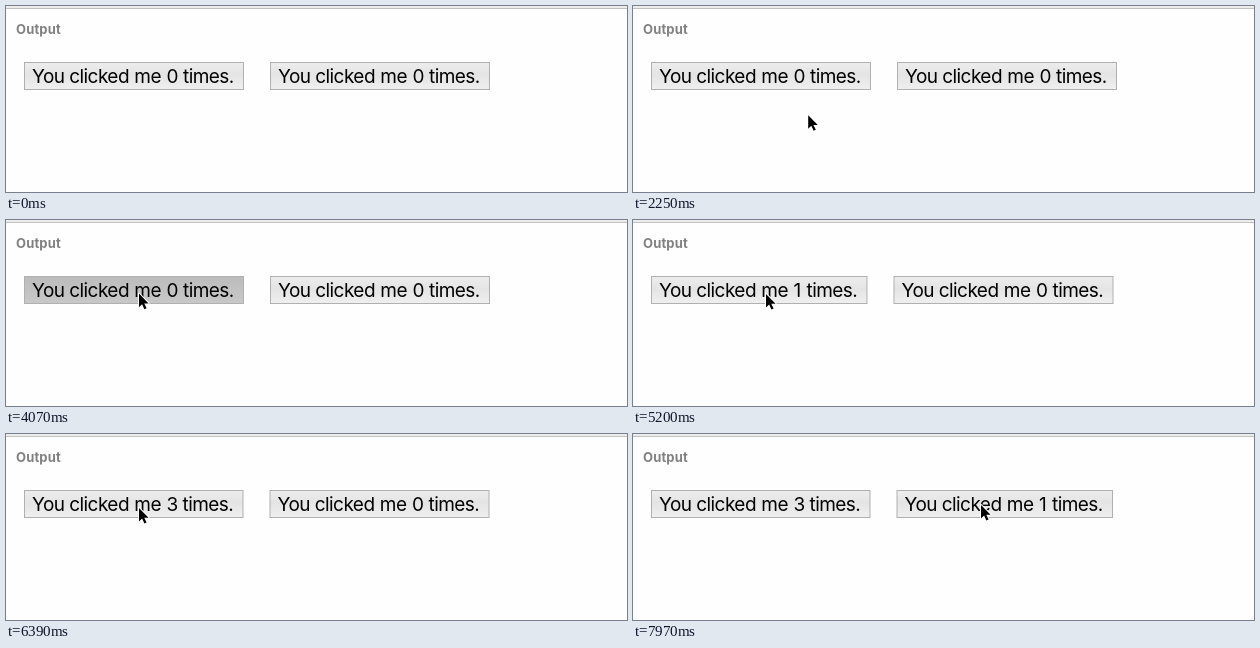
An HTML page that plays this animation: 621x186 px, repeating every 8000 ms.

```html
<!DOCTYPE html>
<html lang="en">
<head>
<meta charset="utf-8">
<title>Click counters</title>
<style>
  html, body { margin: 0; width: 100%; height: 100%; overflow: hidden; background: #fefefe; }
  svg { display: block; width: 621px; height: 186px; }
  text { font-family: Inter, "Liberation Sans", sans-serif; font-optical-sizing: none; white-space: pre; }
  .heading { font-size: 13px; font-weight: 700; letter-spacing: .15px; fill: #808080; }
  .label { font-size: 19px; letter-spacing: -.55px; fill: #000; }
</style>
</head>
<body>
<svg viewBox="0 0 621 186">
  <defs>
    <linearGradient id="idle" x2="0" y2="1">
      <stop stop-color="#ededed"/>
      <stop offset=".45" stop-color="#e4e4e4"/>
      <stop offset="1" stop-color="#efefef"/>
    </linearGradient>
    <linearGradient id="pressed" x2="0" y2="1">
      <stop stop-color="#bcbcbc"/>
      <stop offset="1" stop-color="#c8c8c8"/>
    </linearGradient>
  </defs>
  <rect width="621" height="186" fill="#fefefe"/>
  <rect width="621" height="2" fill="#ececec"/>
  <rect y="2" width="621" height="1" fill="#c2c2c2"/>
  <text class="heading" x="10" y="28">Output</text>
  <g id="buttons"></g>
  <path id="cursor" d="M1 2V15.6L4.1 12.6 6.4 17.6 8.6 16.6 6.3 11.8H10.6Z"
    stroke="#fff" stroke-width="2" stroke-linejoin="round" paint-order="stroke"/>
</svg>
<script>
const LOOP = 8000;
const GAP = 26;
const WIDTHS = [220, 216.5, 219, 219.5]; // button width for each count

// [press, release] times of each button
const CLICKS = [
  [[4070, 4360], [5440, 5610], [6270, 6390]],
  [[7670, 7970]]
];

// The pointer advances in discrete steps: start, end, step count
const STROKES = [[1320, 1550, 5], [1780, 2530, 12], [2590, 3290, 11], [5200, 5200, 1], [6620, 7020, 8]];

// time, x, y
const PATH = [
  [1320, 318, 172], [1435, 244, 124], [1550, 189, 97],
  [1780, 188, 99], [2000, 181, 111], [2250, 172, 106],
  [2390, 112, 64], [2470, 81, 36], [2530, 100, 22],
  [2590, 116, 13], [2800, 156, 34], [2960, 148, 78],
  [3110, 125, 66], [3290, 132, 71.6], [5199, 132, 71.6],
  [5200, 132, 72], [6560, 132, 72], [6620, 137, 73],
  [6730, 200, 72], [6850, 295, 70], [6960, 342, 69], [7020, 347, 69]
];

const svgElement = (tag, parent, attrs = {}) => {
  const node = document.createElementNS("http://www.w3.org/2000/svg", tag);
  for (const name in attrs) node.setAttribute(name, attrs[name]);
  return parent.appendChild(node);
};

const cursor = document.getElementById("cursor");
const buttons = CLICKS.map(clicks => {
  const group = svgElement("g", document.getElementById("buttons"));
  const face = svgElement("rect", group, { x: .5, y: 56.5, height: 27, stroke: "#b0b0b0" });
  const label = svgElement("text", group, { class: "label", y: 77 });
  const word = (text, x) => {
    const span = svgElement("tspan", label, { x });
    span.textContent = text;
    return span;
  };
  word("You ", 8);
  word("clicked ", 45.2);
  word("me ", 110.3);
  return { clicks, group, face, digit: word("0", 142.4), tail: word(" times.", 0) };
});
// Keep the leading space out of the positioned word
buttons.forEach(b => { b.tail.textContent = "times."; });

function snap(t) {
  let held = t;
  for (const [start, end, steps] of STROKES) {
    if (t < start) break;
    const size = (end - start) / (steps - 1 || 1);
    held = t >= end ? end : start + Math.floor((t - start) / size) * size;
  }
  return held;
}

function pointerAt(t) {
  const next = PATH.findIndex(p => p[0] > t);
  if (next < 0) return PATH[PATH.length - 1].slice(1);
  const [t0, x0, y0] = PATH[next - 1];
  const [t1, x1, y1] = PATH[next];
  const k = (t - t0) / (t1 - t0);
  return [x0 + (x1 - x0) * k, y0 + (y1 - y0) * k];
}

function render(t) {
  let left = 18;
  for (const { clicks, group, face, digit, tail } of buttons) {
    const count = clicks.filter(c => t >= c[1]).length;
    const down = clicks.some(([press, release]) => t >= press && t < release);
    const width = WIDTHS[count];
    group.setAttribute("transform", `translate(${left})`);
    face.setAttribute("width", width - 1);
    face.setAttribute("fill", down ? "url(#pressed)" : "url(#idle)");
    digit.textContent = count;
    tail.setAttribute("x", width - 61);
    left += width + GAP;
  }
  const visible = t >= PATH[0][0];
  cursor.setAttribute("visibility", visible ? "visible" : "hidden");
  if (visible) cursor.setAttribute("transform", `translate(${pointerAt(snap(t))})`);
}

const began = performance.now();
function tick() {
  render((performance.now() - began) % LOOP);
  requestAnimationFrame(tick);
}
render(0);
requestAnimationFrame(tick);
</script>
</body>
</html>
```
